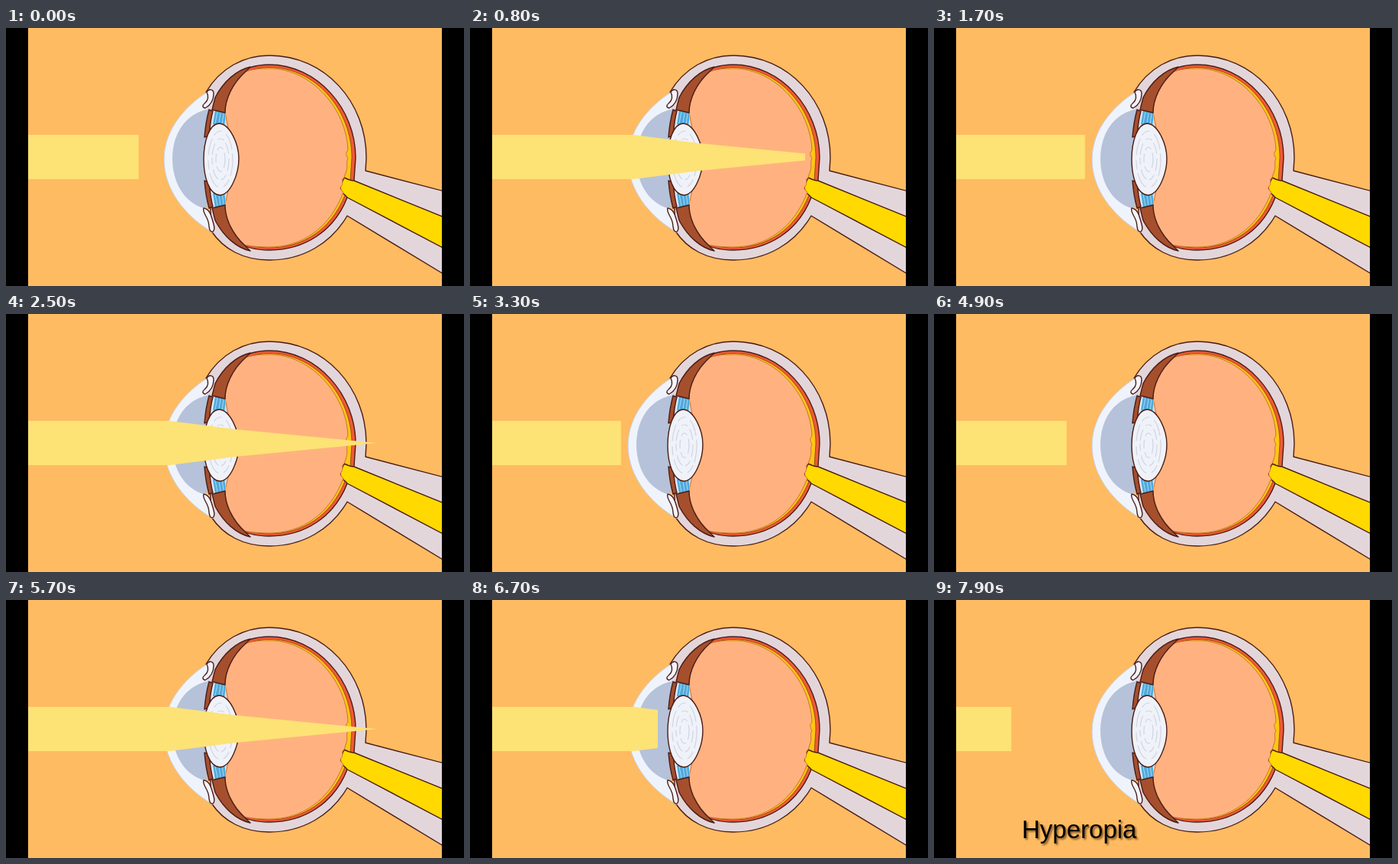
Write an HTML page that moves like this. It is 600 px wide and 338 px high and loops after 8 s.

```html
<!DOCTYPE html>
<html lang="en">
<head>
<meta charset="utf-8">
<title>Hyperopia</title>
<style>
  html, body { margin: 0; width: 100%; height: 100%; overflow: hidden; background: #000; }
  svg { display: block; width: 100vw; height: 100vh; }
  .ink { stroke: #4b1d17; stroke-width: 1.4; stroke-linejoin: round; stroke-linecap: round; }
  .rings { fill: none; stroke: #cfd5e2; stroke-width: 1.2; }
  #label { font: 33px "Liberation Sans", Arial, sans-serif; }
</style>
</head>
<body>
<svg viewBox="0 0 600 338">
  <defs>
    <clipPath id="stage"><rect x="29" width="542" height="338"/></clipPath>
    <clipPath id="wipe"><rect id="front" x="29" y="130" width="0" height="80"/></clipPath>
    <filter id="soft" x="-10%" y="-20%" width="120%" height="150%"><feGaussianBlur stdDeviation="1.3"/></filter>

    <!-- upper half of the front muscles, mirrored for the lower half -->
    <g id="muscle">
      <path d="M270 107 L288 111 L287 130 L268 130 Z" fill="#dbe8f3"/>
      <path d="M274 108 L288 111 L286 131 L271 126 Z" fill="#4fa9dc"/>
      <path d="M277 110 L274 125 M281 111 L279 125 M285 112 L283 127" stroke="#a9d9f2" stroke-width="1" fill="none"/>
      <path class="ink" d="M320 51 C302 55 285 70 274 91 L270 107 L287 111 C287 94 296 73 314 57 Z" fill="#a64f2d"/>
      <path class="ink" d="M266 107 L271 109 C268 120 267 130 266 141 L260 143 C261 130 263 118 266 107 Z" fill="#a64f2d"/>
    </g>
  </defs>

  <g clip-path="url(#stage)">
    <rect x="29" width="542" height="338" fill="#ffbb61"/>

    <!-- outer shell and nerve sheath -->
    <path class="ink" fill="#e3d6db" d="M262 84 C281 52 312 36 345 36 C418 36 472 97 472 170 L471 187
      L580 215.500 V326.500 L447 246 C426 282 389 304 345 304 C311 304 285 290 269 266 Z"/>

    <!-- choroid, retina and vitreous body -->
    <path class="ink" fill="#f05a33" d="M300 62 C313 52 328 48 345 48 C407 48 458 105 458 170 L456 199
      L447 222 C430 266 391 291 345 291 C326 291 312 287 300 279 Z"/>
    <path fill="#ffc514" stroke="#8a3a18" stroke-width=".8" d="M304 65 C316 55 329 51.500 345 51.500 C405 51.500 453 107 453 170 L451 200
      L444 219 C426 264 389 288 345 288 C327 288 315 284 304 276 Z"/>
    <path class="ink" fill="#ffd900" d="M443 196 C447 198 451 200 456 200 L580 250.500 V292 L447 222
      C445 219 442 217 439 215 L438 207 Z"/>
    <path fill="#ffb27f" stroke="#c87528" stroke-width="1" d="M312 58 C321 54 332 53 345 53 C400 53 446 106 448 160
      C444 164 446 167 448 171 C445 176 448 180 446 187 L443 196 C439 198 442 202 440 206 C436 210 439 213 442 215
      C424 263 387 287 345 287 C331 287 321 286 312 284 C294 269 285 248 287 231 L291 213 C309 188 309 157 291 131 L287 111 C286 92 296 73 312 58 Z"/>

    <!-- cornea and front chamber -->
    <path fill="#eff3fc" stroke="#c9cfdf" stroke-width="1" d="M270 80 C237 99 207 132 207 172 C207 212 235 247 271 268 L262 236 L264 106 Z"/>
    <path fill="#b5c2d9" d="M266 106 C235 112 218 139 218 171 C218 203 234 230 262 237 L268 205 V135 Z"/>

    <use href="#muscle"/>
    <use href="#muscle" transform="matrix(1 0 0 -1 0 343)"/>

    <path class="ink" fill="#f4f4fa" d="M263 84 C266 79 272 80 272 86 C272 94 268 101 261 105 C257 104 257 101 260 99 C265 95 266 90 263 84 Z"/>
    <path class="ink" fill="#f4f4fa" d="M259 236 C267 237 269 246 272 257 C274 264 272 269 268 266 C265 263 267 257 264 251 C262 245 257 241 259 236 Z"/>

    <!-- lens -->
    <path class="ink" fill="#f0f2f9" d="M279 125 C294 126 305 153 305 171 C305 191 294 219 280 219 C266 218 259 195 259 172 C259 149 266 126 279 125 Z"/>
    <g class="rings">
      <ellipse cx="281" cy="172" rx="16" ry="37" stroke-dasharray="22 5 12 7"/>
      <ellipse cx="281" cy="172" rx="11" ry="27" stroke-dasharray="15 6 9 4"/>
      <ellipse cx="281" cy="172" rx="6" ry="16" stroke-dasharray="11 5"/>
    </g>

    <path clip-path="url(#wipe)" fill="#fde275" d="M29 140 H214 L300 151 L486 169 L300 187 L214 198 H29 Z"/>

    <g id="label" opacity="0">
      <text x="117" y="314" fill="#5c3a12" opacity=".75" filter="url(#soft)">Hyperopia</text>
      <text x="115" y="312">Hyperopia</text>
    </g>
  </g>
</svg>
<script>
  const LOOP = 8000, FRAME = 100;
  const TICK = 70.1, TICKS = 23, FIRST = 6, FULL = 18;
  const STRIDE = 24.12, REACH = 460;
  const front = document.getElementById('front');
  const label = document.getElementById('label');
  const clamp = v => Math.max(0, Math.min(1, v));

  function draw(now) {
    const t = Math.floor(now % LOOP / FRAME) * FRAME;
    // the light advances in even strides, then rests at its full length
    const step = (FIRST + Math.floor((t + 2) / TICK)) % TICKS;
    front.setAttribute('width', step < FULL ? step * STRIDE : REACH);
    label.setAttribute('opacity', clamp((t - 6900) / 600));
  }

  const start = performance.now();
  function loop() {
    draw(performance.now() - start);
    requestAnimationFrame(loop);
  }
  loop();
</script>
</body>
</html>
```
